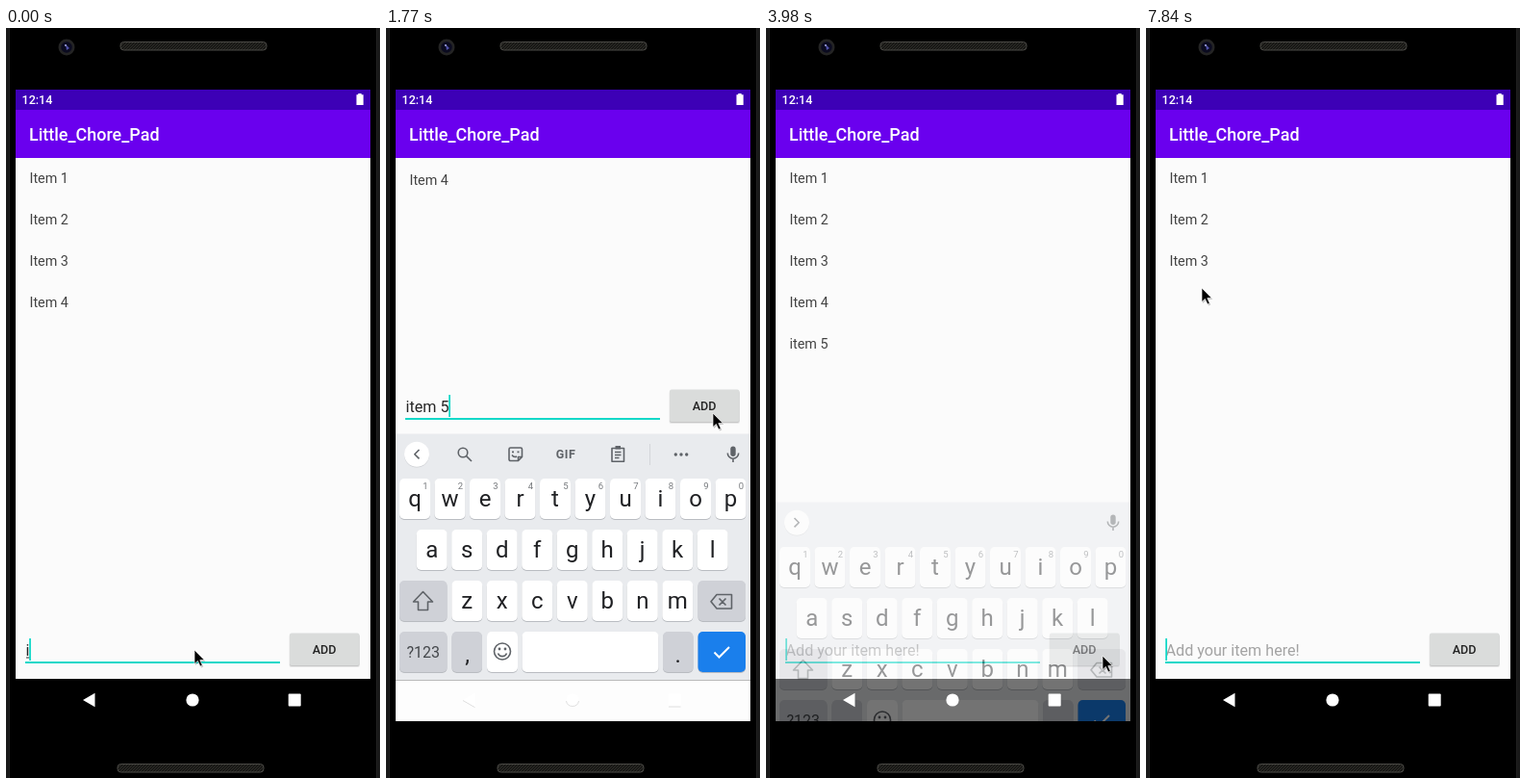
An HTML page for the animation above (7.99 s loop, 389 by 779 pixels).

```html
<!DOCTYPE html>
<html lang="en">
<head>
<meta charset="utf-8">
<title>Chore list demo</title>
<style>
  html, body { margin: 0; width: 100%; height: 100%; overflow: hidden; background: #000; }
  svg { display: block; width: 389px; height: 779px; font-family: Roboto, sans-serif; }
  text { white-space: pre; }
  .mid { text-anchor: middle; }
  .item { font-size: 14.35px; fill: #424242; }
  .field { font-size: 16.15px; }
  .key { font-size: 24px; fill: #202124; text-anchor: middle; }
  .num { font-size: 9.5px; fill: #75787c; text-anchor: middle; }
  .hint { font-size: 16.5px; fill: #6a6e73; text-anchor: middle; }
  .line { fill: none; stroke: #5f6368; stroke-width: 1.6; stroke-linejoin: round; }
</style>
</head>
<body>
<svg viewBox="0 0 389 779">
  <defs>
    <clipPath id="screen"><rect x="10" y="64" width="369" height="656"/></clipPath>
    <clipPath id="page"><rect x="10" y="135" width="369" height="541"/></clipPath>
    <pattern id="mesh" width="3" height="3" patternUnits="userSpaceOnUse">
      <rect width="3" height="3" fill="#171715"/><path d="M0 3L3 0" stroke="#35342e" stroke-width=".8"/>
    </pattern>
  </defs>

  <!-- phone body -->
  <rect width="389" height="779" fill="#000"/>
  <path d="M1.5 0V779M387.5 0V779" stroke="#191919" stroke-width="3"/>
  <path d="M3.5 0V779M385.5 0V779" stroke="#2a2a2a" stroke-width=".8"/>
  <g fill="url(#mesh)" stroke="#4b4a46">
    <rect x="119" y="14.5" width="152" height="8.5" rx="3.5"/>
    <rect x="116" y="764.5" width="152" height="8.5" rx="3.5"/>
  </g>
  <circle cx="63" cy="20" r="8.5" fill="#242424"/>
  <circle cx="63" cy="20" r="5.8" fill="#0b0b20"/>
  <path d="M62 17L66 21L63 23Z" fill="#5052a8"/>
  <circle cx="62" cy="18" r="1.1" fill="#9ea0dc"/>

  <!-- app -->
  <rect x="10" y="135" width="369" height="541" fill="#fbfbfb"/>
  <g clip-path="url(#page)">
    <g id="list"></g>
    <g id="form">
      <rect x="20" y="658" width="265" height="2" fill="#14d8c8"/>
      <text id="field" class="field" x="20.5" y="652"></text>
      <rect id="under" x="21" y="653.5" height="1" fill="#333"/>
      <rect id="caret" y="634" width="1.8" height="23" fill="#14d8c8"/>
      <rect x="294.5" y="630" width="73.5" height="34" rx="2" fill="#000" opacity=".08"/>
      <rect x="295" y="629.5" width="72.5" height="33.5" rx="2" fill="#000" opacity=".14"/>
      <rect id="button" x="295" y="628.5" width="72.5" height="33.5" rx="2"/>
      <text class="mid" x="331" y="649.6" font-size="12.56" font-weight="500" fill="#242424">ADD</text>
    </g>
  </g>
  <rect x="10" y="64" width="369" height="21" fill="#3d00b6"/>
  <rect x="10" y="85" width="369" height="50" fill="#6a00ee"/>
  <text x="16.5" y="79" font-size="12.56" font-weight="500" fill="#fff">12:14</text>
  <path d="M366.3 68h3.4v1.3h2v10.7h-7.2v-10.7h1.8z" fill="#fff"/>
  <text x="24" y="117" font-size="17.94" font-weight="500" fill="#fff">Little_Chore_Pad</text>

  <!-- keyboard -->
  <g clip-path="url(#screen)">
    <g id="board">
      <rect x="10" y="421.5" width="369" height="256" fill="#e9ebee"/>
      <rect x="10" y="677.5" width="369" height="193" fill="#fdfdfd"/>
      <g id="keys"></g>
      <circle cx="32" cy="443.5" r="13" fill="#ccced2"/>
      <circle cx="32" cy="442.7" r="13" fill="#fff"/>
      <path id="arrow" class="line"/>
      <g fill="#5f6368">
        <rect x="358.3" y="434.5" width="5.4" height="10.5" rx="2.7"/>
        <path class="line" d="M355.3 441.5a5.7 5.7 0 0 0 11.4 0M361 447.2V451"/>
      </g>
      <g id="words">
        <path d="M139.5 432V454M247.5 432V454" stroke="#c9cbcf"/>
        <text class="hint" x="90.5" y="449"></text>
        <text class="hint" x="193" y="449"></text>
        <text class="hint" x="295" y="449"></text>
      </g>
      <g id="tools">
        <circle class="line" cx="80" cy="441" r="4.8"/><path class="line" d="M83.6 444.6L89 450"/>
        <path class="line" d="M129.5 436h10.5a1.5 1.5 0 0 1 1.5 1.5v8l-4 4h-8a1.5 1.5 0 0 1-1.5-1.5v-10.500a1.500 1.500 0 0 1 1.500-1.500zM137.500 449.500v-4h4M131 443.500q2 3 5 1.500"/>
        <path d="M131 439.500h2v1.800h-2zM136.500 439.500h2v1.800h-2z" fill="#5f6368"/>
        <text class="mid" x="187" y="447" font-size="12.5" font-weight="700" letter-spacing=".5" fill="#5f6368">GIF</text>
        <path class="line" d="M235 436.500h12.500v13.800h-12.500zM238 440.500h6.500M238 443.500h6.500M238 446.500h4.500"/>
        <path d="M238.500 434h5.500v3.500h-5.500z" fill="#5f6368"/>
        <path d="M274.500 432V454" stroke="#d3d5d9"/>
        <g fill="#5f6368"><circle cx="301.300" cy="443" r="1.700"/><circle cx="307" cy="443" r="1.700"/><circle cx="312.700" cy="443" r="1.700"/></g>
      </g>
    </g>
  </g>

  <!-- system buttons -->
  <g fill="#fff">
    <path d="M80 698L92.500 690.800V705.200Z"/>
    <circle cx="194" cy="698" r="6.600"/>
    <rect x="293.700" y="691.500" width="13" height="13" rx="1"/>
  </g>
  <path id="trace" d="M80 698.500L92.500 705.700M187.500 699a6.600 6.600 0 0 0 13 0M294 705H306.500" fill="none" stroke="#dcdcdc" stroke-width=".9"/>

  <g id="mouse">
    <path d="M1 1.500V16L4.400 13L7 18.500L9.300 17.500L6.800 12.100H11.400Z" fill="#000" opacity=".2"/>
    <path d="M0 0V14.500L3.400 11.400L6 17L8.300 16L5.800 10.600H10.400Z" fill="#000" stroke="#fff" stroke-width=".7"/>
  </g>
</svg>

<script>
const $ = id => document.getElementById(id);
const set = (el, attrs) => { for (const k in attrs) el.setAttribute(k, attrs[k]); };
const show = (el, on) => el.style.display = on ? '' : 'none';

const LOOP = 7990, TICK = 147.9, LAST = 53;

// Points are [tick, ...values], joined by straight lines.
function track(points, n) {
  const i = points.findIndex(p => p[0] >= n);
  if (i < 0) return points[points.length - 1].slice(1);
  const b = points[i], a = points[i - 1] || b;
  const f = a === b ? 0 : (n - a[0]) / (b[0] - a[0]);
  return b.slice(1).map((v, k) => a[k + 1] + (v - a[k + 1]) * f);
}

// Latest value whose tick has come.
const latest = (steps, n) => steps.filter(s => s[0] <= n).pop()[1];

const mousePath = [[0, 196, 646], [6, 196, 646], [8, 262, 552], [10, 375, 440], [12, 340, 400],
  [14, 330, 391], [23, 330, 391], [24, 350, 560], [25, 362, 685], [27, 350, 652], [28, 350, 652],
  [33, 62, 330], [42, 62, 330], [43, 58, 282], [45, 58, 282], [46, 57, 281], [49, 57, 281], [53, 58, 270]];
const boardPath = [[0, 150, 0], [1, 40, .7], [2, 0, 1], [26, 0, 1], [27, 71, .45], [28, 120, .05], [29, 150, 0]];
const fades = {
  4: [[50, 1], [51, .35], [52, 0]],
  5: [[17, 0], [18, .2], [19, .65], [20, 1], [38, 1], [39, 0]]
};
const typed = [[0, 'i'], [2, 'it'], [3, 'item'], [4, 'item '], [6, 'item 5'], [18, '']];
const guesses = [[0, ['', '', '']], [2, ['i', 'I', "I'm"]], [3, ['it', 'item', 'items']]];
const caretOff = [[9, 12], [15, 17], [22, 25], [28, 32], [35, 38], [42, 45], [49, 52]];

const within = (n, a, b) => n >= a && n < b;

function buildKeys() {
  const key = (x, y, w, fill = '#fff') =>
    `<rect x="${x}" y="${y + 1}" width="${w}" height="42" rx="5" fill="#b9bcc1"/>` +
    `<rect x="${x}" y="${y}" width="${w}" height="42" rx="5" fill="${fill}"/>`;
  const grey = '#cfd1d7';
  let out = '';
  [['qwertyuiop', 30], ['asdfghjkl', 47.7], ['zxcvbnm', 84.3]].forEach(([row, x0], r) => {
    const y = 468 + r * 53;
    [...row].forEach((c, i) => {
      const x = x0 + i * 36.5;
      out += key(x - 16, y, 32, '#fff') + `<text class="key" x="${x}" y="${y + 29}">${c}</text>`;
      if (!r) out += `<text class="num" x="${x + 11}" y="478.5">${(i + 1) % 10}</text>`;
    });
  });
  out += key(14, 574, 49.5, grey) + key(324.5, 574, 49.5, grey) +
    key(14, 627, 49.5, grey) + key(68.500, 627, 31.500, grey) + key(105, 627, 32) +
    key(141.500, 627, 142) + key(288, 627, 31.500, grey) + key(324.500, 627, 49.500, '#1a7fec');
  out += `<path class="line" d="M38.500 585.500L48.500 596H43.500V604.500H33.500V596H28.500Z"/>
    <path class="line" d="M344 588.500H359.500V603H344L338 595.700ZM346.500 592.500L353.500 599.500M353.500 592.500L346.500 599.500"/>
    <text class="mid" x="38.700" y="653.500" font-size="16" fill="#44474b">?123</text>
    <text class="key" x="84.500" y="659">,</text><text class="key" x="303.700" y="659">.</text>
    <circle class="line" cx="121" cy="647.500" r="8.500"/>
    <path class="line" d="M116.500 649.500a4.800 4.800 0 0 0 9 0"/>
    <circle cx="118" cy="645" r="1.400" fill="#5f6368"/><circle cx="124" cy="645" r="1.400" fill="#5f6368"/>
    <path d="M341.500 648.500L346.500 653.500L357 643" fill="none" stroke="#fff" stroke-width="2"/>`;
  $('keys').innerHTML = out;
}

function buildList() {
  $('list').innerHTML = [1, 2, 3, 4, 5].map(i =>
    `<text class="item" x="24.500" y="${118 + i * 43}">${i < 5 ? 'Item' : 'item'} ${i}</text>`).join('');
}

function draw(n) {
  const up = within(n, 1, 27);
  set($('list'), { transform: `translate(0 ${up ? -127 : 0})` });
  set($('form'), { transform: `translate(0 ${up ? -253 : 0})` });
  for (const i in fades) set($('list').children[i - 1], { opacity: track(fades[i], n)[0] });

  const text = latest(typed, n), field = $('field');
  field.textContent = text || 'Add your item here!';
  set(field, { fill: text ? '#262626' : '#a3a3a3' });
  const width = text ? field.getComputedTextLength() : 0;
  set($('caret'), { x: 20.2 + width });
  show($('caret'), !caretOff.some(([a, b]) => within(n, a, b)));
  set($('under'), { width });
  show($('under'), n < 4);
  set($('button'), { fill: within(n, 17, 20) ? '#c1c1c1' : '#dadcdb' });

  const [drop, alpha] = track(boardPath, n);
  set($('board'), { transform: `translate(0 ${drop})`, opacity: alpha });
  show($('trace'), alpha === 1);
  const tools = within(n, 6, 27);
  show($('tools'), tools);
  show($('words'), within(n, 2, 6));
  set($('arrow'), { d: tools ? 'M34.500 438L29.800 442.700L34.500 447.400' : 'M29.500 438L34.200 442.700L29.500 447.400' });
  const words = latest(guesses, n);
  $('words').querySelectorAll('text').forEach((el, i) => el.textContent = words[i]);

  set($('mouse'), { transform: `translate(${track(mousePath, n)})` });
}

let shown = -1;
function frame(now) {
  const n = Math.min(LAST, Math.floor((now % LOOP + 14) / TICK));
  if (n !== shown) draw(shown = n);
  requestAnimationFrame(frame);
}

buildKeys();
buildList();
draw(0);
requestAnimationFrame(frame);
</script>
</body>
</html>
```
